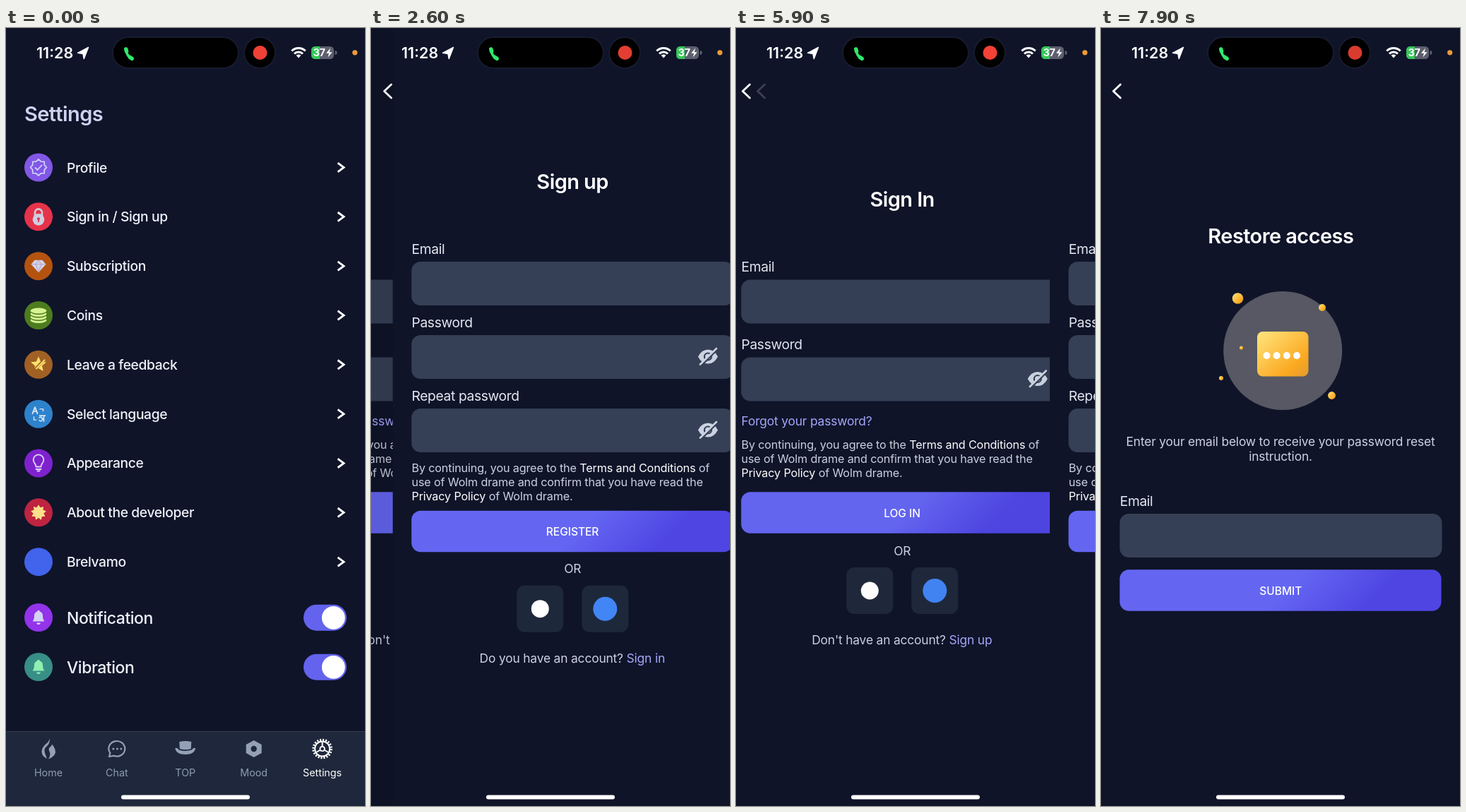
Write an HTML page that moves like this. It is 508 px wide and 1102 px high and loops after 8 s.

```html
<!DOCTYPE html>
<html lang="en">
<head>
<meta charset="utf-8">
<title>Account screens</title>
<style>
  html, body { margin: 0; width: 100%; height: 100%; overflow: hidden; background: #0f1429; }
  svg { display: block; width: 100%; height: 100%; }
  text { font-family: Inter, Roboto, "Liberation Sans", sans-serif; fill: #e2e8f0; white-space: pre; }
  .title { font-size: 29px; font-weight: 600; letter-spacing: -.02em; fill: #fff; }
  .row { font-size: 19.3px; font-weight: 500; letter-spacing: -.02em; fill: #eef1f8; }
  .big { font-size: 23px; }
  .label { font-size: 19.3px; letter-spacing: -.02em; }
  .body { font-size: 17.4px; letter-spacing: -.01em; fill: #cbd2e2; }
  .terms { font-size: 16.2px; letter-spacing: -.01em; fill: #cbd2e2; }
  .btn { font-size: 15.5px; font-weight: 500; fill: #fff; }
  .tab { font-size: 14.3px; fill: #8f9bb1; }
  .on { fill: #fff; }
  .link { fill: #a5a8fb; }
  .mid { text-anchor: middle; }
  .line { fill: none; stroke-linecap: round; stroke-linejoin: round; }
</style>
</head>
<body>
<svg id="stage" viewBox="0 0 508 1102">
  <defs>
    <linearGradient id="indigo" gradientUnits="userSpaceOnUse" x1="233" y1="29" x2="303" y2="99">
      <stop stop-color="#6466f2"/><stop offset="1" stop-color="#4f45e3"/>
    </linearGradient>
    <linearGradient id="gold" x2="1" y2="1">
      <stop stop-color="#ffe680"/><stop offset=".75" stop-color="#fba820"/><stop offset="1" stop-color="#e09a30"/>
    </linearGradient>
  </defs>
  <g id="pages"></g>
  <g id="backs"></g>
  <g id="status">
    <rect x="151" y="13" width="178" height="44" rx="22" stroke="#171b2e" stroke-width="2"/>
    <circle cx="359" cy="35" r="22" stroke="#171b2e" stroke-width="2"/>
    <circle id="rec" cx="359.500" cy="35" r="10"/>
    <g class="line" stroke="#30e86a">
      <path stroke-width="3.600" d="M169.500 30Q170.500 40 179 44"/>
      <path stroke-width="5.500" d="M169.800 30l.8 3M175.500 41.500l2.600 1.800"/>
    </g>
    <text x="43" y="42.500" font-size="21.500" font-weight="600" style="fill:#fff">11:28</text>
    <path d="M116.500 27.500L101.500 35.300l7.500 1.200 1.300 7z" fill="#fff" stroke="#fff" stroke-width="1.500" stroke-linejoin="round"/>
    <g fill="none" stroke="#fff" stroke-width="3">
      <path d="M404.300 32.500A13.700 13.700 0 0 1 423.700 32.500"/>
      <path d="M408 36.500A8.500 8.500 0 0 1 420 36.500"/>
    </g>
    <path d="M410.600 38.800a4.800 4.800 0 0 1 6.800 0L414 42.500z" fill="#fff"/>
    <rect x="432" y="26" width="32" height="18" rx="5.500" fill="#5c5f6d"/>
    <path d="M444 26h-6.500a5.500 5.500 0 0 0-5.500 5.500v7a5.500 5.500 0 0 0 5.500 5.500h6.500z" fill="#35c759"/>
    <path d="M465.500 32a3 3 0 0 1 0 6z" fill="#5c5f6d"/>
    <text x="434.500" y="40.200" font-size="14.500" font-weight="700" letter-spacing="-.4" style="fill:#fff">37</text>
    <path d="M459 28.500l-6 7.300h4l-1.500 5.700 6-7.300h-4z" fill="#fff"/>
    <circle cx="493.700" cy="34.800" r="3.600" fill="#ee9a38"/>
    <rect x="163" y="1086.500" width="182" height="6" rx="3" fill="#fff"/>
  </g>
</svg>
<script>
const W = 508, H = 1102, LOOP = 8000, STEP = 100;
const BG = '#0f1429', FIELD = '#353f55';
const $ = id => document.getElementById(id);

// ---- drawing helpers ----
const text = (cls, x, y, s) => `<text class="${cls}" x="${x}" y="${y}">${s}</text>`;
const at = (x, y, s) => `<g transform="translate(${x} ${y})">${s}</g>`;
const disc = (x, y, r, fill) => `<circle cx="${x}" cy="${y}" r="${r}" fill="${fill}"/>`;
const box = (x, y, w, h, r, fill) => `<rect x="${x}" y="${y}" width="${w}" height="${h}" rx="${r}" fill="${fill}"/>`;
const fill = (d, color) => `<path d="${d}" fill="${color}"/>`;
const line = (d, color, width) => `<path class="line" d="${d}" stroke="${color}" stroke-width="${width}"/>`;

function star(points, outer, inner) {
  let d = '';
  for (let i = 0; i < points * 2; i++) {
    const a = i * Math.PI / points - Math.PI / 2, r = i % 2 ? inner : outer;
    d += (i ? 'L' : 'M') + (r * Math.cos(a)).toFixed(2) + ' ' + (r * Math.sin(a)).toFixed(2);
  }
  return d + 'z';
}

const page = (id, body) =>
  `<g id="${id}">${box(0, 0, W, H, 0, BG)}${body}<rect class="dim" width="${W}" height="${H}" opacity="0"/></g>`;

// ---- settings ----
const bell = color =>
  fill('M-8.500 5.500Q-6 3-6-2.500A6 6 0 0 1-1.800-8.500a1.800 1.800 0 0 1 3.600 0A6 6 0 0 1 6-2.500Q6 3 8.500 5.500z', color) +
  fill('M-2.800 7.500h5.600a2.800 2.500 0 0 1-5.600 0z', color);

const coin = y => `<ellipse cy="${y}" rx="11.500" ry="4" fill="#d6f391"/>`;
const coins = [7, 2.5, -2, -6.5].map((y, i) =>
  (i ? `<ellipse cy="${y + 1.3}" rx="11.500" ry="4.200" fill="#4d7c1e"/>` : '') + coin(y)).join('');

const rows = [
  ['Profile', '#8257e6', line(star(8, 11.5, 9), '#d0d2f8', 1.8) + line('M-4.500 .5l3 3 6-6.500', '#d0d2f8', 1.8)],
  ['Sign in / Sign up', '#e6334a',
    line('M-5-1v-5a5 5 0 0 1 10 0v5', '#ccd0e0', 2.6) + disc(0, 4, 8.3, '#ccd0e0') +
    disc(0, 3, 2, '#e6334a') + line('M0 3v4', '#e6334a', 1.8)],
  ['Subscription', '#b4530f',
    fill('M-10.500-2.500L-5.500-8.500h11l5 6L0 9z', '#d6d2e4') +
    line('M-10-2.500h20M-4-2.500L0 8 4-2.500 0-8-4-2.500', '#b3a5c9', 1)],
  ['Coins', '#4d7c1e', coins],
  ['Leave a feedback', '#a16024',
    fill(star(5, 11.5, 5.2), '#fde36d') + line('M-7 9L9-8', '#a16024', 4) + line('M-3 5.500L8.500-6.500', '#fde36d', 2)],
  ['Select language', '#2e82cc',
    line('M-8.500-.5l3.500-9 3.500 9M-7.300-3.500h4.600', '#d3e4f7', 1.9) +
    line('M1.500 2.500h8M7.500 2.500v8M1 5q4-1.500 3.500 1 3 2-.5 4-2 .5-3-1M4.500 6.500h3', '#d3e4f7', 1.6) +
    line('M2-7h4.500v3M-6.500 4v4.500h3', '#d3e4f7', 1.4)],
  ['Appearance', '#7e22ce',
    line('M-3.500 5Q-3.500 2-5.500 0A7.300 7.300 0 1 1 5.500 0Q3.500 2 3.500 5z', '#dcd3f3', 1.9) +
    line('M-3.500 8.500h7M-1.500 11h3', '#dcd3f3', 2)],
  ['About the developer', '#be2440', fill(star(9, 11, 7.4), '#fde08a')],
  ['Brelvamo', '#4263eb', '']
];
const badge = (y, color, icon) => at(46, y, disc(0, 0, 20, color) + icon);

const list = rows.map(([name, color, icon], i) => {
  const y = 197.5 + i * 69.83;
  return badge(y, color, icon) + text('row', 86, y + 7, name) +
    `<path d="M469.500 ${y - 6.3}l8.500 6.300-8.500 6.300" fill="none" stroke="#fff" stroke-width="2.900"/>`;
}).join('');

const toggle = (name, y, color, tint) =>
  badge(y, color, bell(tint)) + text('row big', 86, y + 8.8, name) +
  box(421, y - 18.3, 61, 37, 18.5, '#6363ee') + disc(463.3, y + .3, 16.4, '#fff');

const GREY = '#94a0b6';
const spokes = [0, 120, 240].map(a => `<path d="M0-3V-9.500" transform="rotate(${a})" stroke="#fff" stroke-width="2"/>`).join('');
const tabs = [
  ['Home', fill('M1.500-14.500Q3-8-3.500-2.500-6.500 0-5 6l3 8Q-10 10-9.500 3-9-2-4-6.500 1-10 1.500-14.500zM5-6.500Q10-1 10 5 9 11 0 14.500 4 8 1.500 4-1-1 3-3 4.500-4 5-6.500z', GREY)],
  ['Chat', line('M-11 11l1.500-5A11.500 10.800 0 1 1-4.500 9.800z', GREY, 2.2) + [-5, 0.5, 6].map(x => disc(x, 0, 1.5, GREY)).join('')],
  ['TOP', fill('M-8.500-10Q0-12 8.500-10L8 0Q0 2.500-8 0z', GREY) +
    fill('M-14.500-1Q-11-2-9 1.500 0 4.500 9 1.500 11-2 14.500-1 13 8 0 8-13 8-14.500-1z', GREY)],
  ['Mood', fill('M0-12l11 6v12L0 12-11 6V-6z', GREY) + disc(0, 0, 4.2, '#1e273b')],
  ['Settings', `<circle r="12.800" fill="none" stroke="#fff" stroke-width="3" stroke-dasharray="2.100 1.921"/>
    <circle r="10.500" fill="none" stroke="#fff" stroke-width="2"/><circle r="3.200" fill="none" stroke="#fff" stroke-width="1.800"/>` + spokes]
].map(([name, icon], i) => {
  const x = 60 + i * 96.9;
  return at(x, 1021, icon) + text(i == 4 ? 'tab mid on' : 'tab mid', x, 1060, name);
}).join('');

const settings = `<g style="--c:0">${text('title', 26, 131.5, 'Settings').replace('<text', '<text style="fill:#cdd3f0"')}</g>` +
  list + toggle('Notification', 835, '#9333ea', '#d3d3f5') + toggle('Vibration', 905, '#378f87', '#8ff0b0') +
  box(0, 996, W, 106, 0, '#1e273b') + box(0, 996, W, 1, 0, '#354055') + tabs;

// ---- forms ----
const eye = at(446, 0,
  fill('M-14 0Q-9-10 0-10T14 0Q9 10 0 10T-14 0z', '#cbd2e0') +
  `<circle r="5" fill="none" stroke="${FIELD}" stroke-width="2.200"/>` +
  line('M-9 12L13-10', FIELD, 3) + line('M-11 11L12-11.500', '#cbd2e0', 2.6));

const field = (label, y, secret) => text('label', 26.7, y - 11.5, label) +
  box(26.5, y, 456, 62, 13, FIELD) + (secret ? at(0, y + 30.5, eye) : '');

const button = (label, y) => at(26.5, y, box(0, 0, 455, 58.5, 13, 'url(#indigo)')) +
  text('btn mid', 254.3, y + 35.3, label);

const strong = s => `<tspan class="on">${s}</tspan>`;
const terms = y => [
  `By continuing, you agree to the ${strong('Terms and Conditions')} of`,
  'use of Wolm drame and confirm that you have read the',
  `${strong('Privacy Policy')} of Wolm drame.`
].map((s, i) => text('terms', 26.7, y + i * 20, s)).join('');

const social = (y, ask, link) => text('body mid', 254.5, y - 17.5, 'OR') +
  box(175.5, y, 66, 66, 11, '#1e283b') + disc(208.5, y + 33, 12.5, '#fff') +
  box(267.5, y, 66, 66, 11, '#1e283b') + disc(300.5, y + 33, 17, '#4285f4') +
  text('body mid', 254, y + 109, `${ask} <tspan class="link">${link}</tspan>`);

const heading = (s, y) => text('title mid', 254.3, y, s);

const signIn = heading('Sign In', 253) + field('Email', 356.5) + field('Password', 466.5, true) +
  text('body link', 26.7, 563, 'Forgot your password?') + terms(596.3) +
  button('LOG IN', 657.3) + social(764, "Don't have an account?", 'Sign up');

const signUp = heading('Sign up', 227.5) + field('Email', 331) + field('Password', 435, true) +
  field('Repeat password', 539, true) + terms(628.5) +
  button('REGISTER', 683.7) + social(789.7, 'Do you have an account?', 'Sign in');

const art = `<g id="art">${disc(257.2, 457, 84, '#575863')}${box(221, 430, 72.5, 63.5, 8, 'url(#gold)')}` +
  [234.5, 248.6, 262.8, 277].map(x => disc(x, 464, 5, '#fff')).join('') +
  [[193.5, 383, 7.8], [313, 396, 5], [198.5, 453, 2.5], [170, 496, 3], [326.5, 520.5, 5.4]]
    .map(([x, y, r]) => disc(x, y, r, 'url(#gold)')).join('') + '</g>';

const restore = heading('Restore access', 305) + art +
  text('body mid', 254, 592.3, 'Enter your email below to receive your password reset') +
  text('body mid', 254, 613.3, 'instruction.') +
  field('Email', 688) + button('SUBMIT', 767.3);

$('pages').innerHTML = page('settings', settings) + page('signIn', signIn) +
  page('signUp', signUp) + page('restore', restore);
$('backs').innerHTML = ['backIn', 'backUp', 'backRestore'].map(id =>
  `<g id="${id}">${line('M27.500 80L17.500 89.500 27.500 99', '#fff', 2.9)}</g>`).join('');

// ---- motion ----
const clamp = v => Math.min(1, Math.max(0, v));
// Remaining distance of a critically damped spring, 1 until it starts.
const left = (t, start) => {
  const x = Math.max(0, t - start) * .011;
  return (1 + x) * Math.exp(-x);
};
const move = (id, x) => $(id).setAttribute('transform', `translate(${x.toFixed(2)} 0)`);
const fade = (id, v) => $(id).setAttribute('opacity', clamp(v).toFixed(3));
const dim = (id, v) => $(id).querySelector('.dim').setAttribute('opacity', clamp(v).toFixed(3));

function draw(t) {
  const inLeft = left(t, 580), pop = 1 - left(t, 5573), restoreLeft = left(t, 6500);
  const upLeft = clamp(left(t, 2190) + pop);
  const covered = 2 - upLeft - restoreLeft;

  move('settings', -.3 * W * (1 - inLeft));
  move('signIn', W * inLeft - .3 * W * covered);
  move('signUp', W * upLeft);
  move('restore', W * restoreLeft);
  dim('settings', .1 * (1 - inLeft));
  dim('signIn', .1 * covered);
  dim('restore', (7200 - t) / 1600);
  fade('art', t >= 7000 ? 1 : 0);

  move('backIn', W * inLeft - 64 * covered);
  fade('backIn', (1 - covered) * 1.15);
  move('backUp', pop > 0 ? 15 * pop : 20 * upLeft);
  fade('backUp', (1 - upLeft) * (pop > 0 ? 1.5 : 1));
  move('backRestore', 20 * restoreLeft);
  fade('backRestore', 1 - restoreLeft);

  const glow = (1 - Math.cos((t - 2100) / 2900 * 2 * Math.PI)) / 2;
  $('rec').setAttribute('fill', `rgb(${217 + 38 * glow} ${60 + 8 * glow} ${46 + 12 * glow})`);
}

const begin = performance.now();
function tick() {
  const t = (performance.now() - begin) % LOOP;
  draw(Math.floor(t / STEP) * STEP);
  requestAnimationFrame(tick);
}
tick();
</script>
</body>
</html>
```
